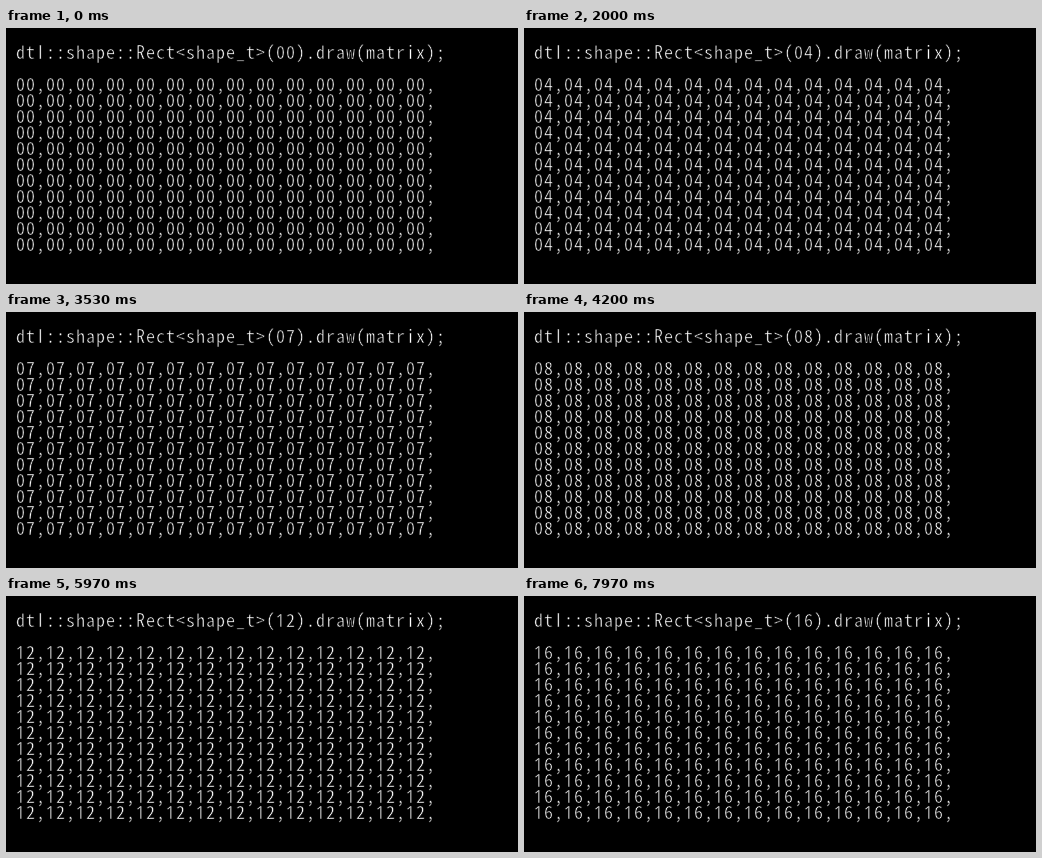
Recreate the animation shown at these times as an HTML page. Size 512x256 px, loop 8000 ms.

```html
<!DOCTYPE html>
<html lang="en">
<head>
<meta charset="utf-8">
<title>Rect fill counter</title>
<style>
  html, body { margin: 0; width: 100%; height: 100%; overflow: hidden; background: #000; }
  svg { display: block; width: 512px; height: 256px; }
  /* The black outline thins the strokes to about one pixel. */
  text {
    font: 300 18px "Noto Sans Mono CJK JP", "Noto Sans CJK JP", "DejaVu Sans Mono", monospace;
    font-feature-settings: "hwid";
    fill: #fff;
    stroke: #000;
    stroke-width: 0.5px;
    text-anchor: middle;
    white-space: pre;
  }
  .plain { font-family: "Noto Sans", sans-serif; }
</style>
</head>
<body>
<svg id="stage" viewBox="0 0 512 256"></svg>
<script>
const LOOP = 8000, CELL = 10, LEFT = 14.4, COLS = 14, ROWS = 11;
const STEPS = [0, 500, 1000, 1500, 2000, 2500, 3030, 3530, 4030,
               4470, 4970, 5470, 5970, 6500, 7000, 7470, 7970];
const NS = "http://www.w3.org/2000/svg";
const stage = document.getElementById("stage");

function make(tag, parent, attrs) {
  const el = document.createElementNS(NS, tag);
  for (const key in attrs) el.setAttribute(key, attrs[key]);
  return parent.appendChild(el);
}

// One line of text on a fixed grid of character cells.
function line(y, length) {
  const text = make("text", stage, { y });
  return Array.from({ length }, (_, i) => make("tspan", text, { x: LEFT + i * CELL }));
}

// "l" and "1" come from a face that draws them without a foot.
function write(cells, string) {
  cells.forEach((cell, i) => {
    cell.textContent = string[i];
    cell.setAttribute("class", "l1".includes(string[i]) ? "plain" : "");
  });
}

const title = n => `dtl::shape::Rect<shape_t>(${n}).draw(matrix);`;
const head = line(31, title("00").length);
const rows = Array.from({ length: ROWS }, (_, r) => line(63 + r * 16, COLS * 3));

let shown = -1;
function draw() {
  const t = performance.now() % LOOP;
  const value = STEPS.filter(s => s <= t).length - 1;
  if (value !== shown) {
    shown = value;
    const n = String(value).padStart(2, "0");
    write(head, title(n));
    rows.forEach(cells => write(cells, `${n},`.repeat(COLS)));
  }
  requestAnimationFrame(draw);
}
draw();
</script>
</body>
</html>
```
